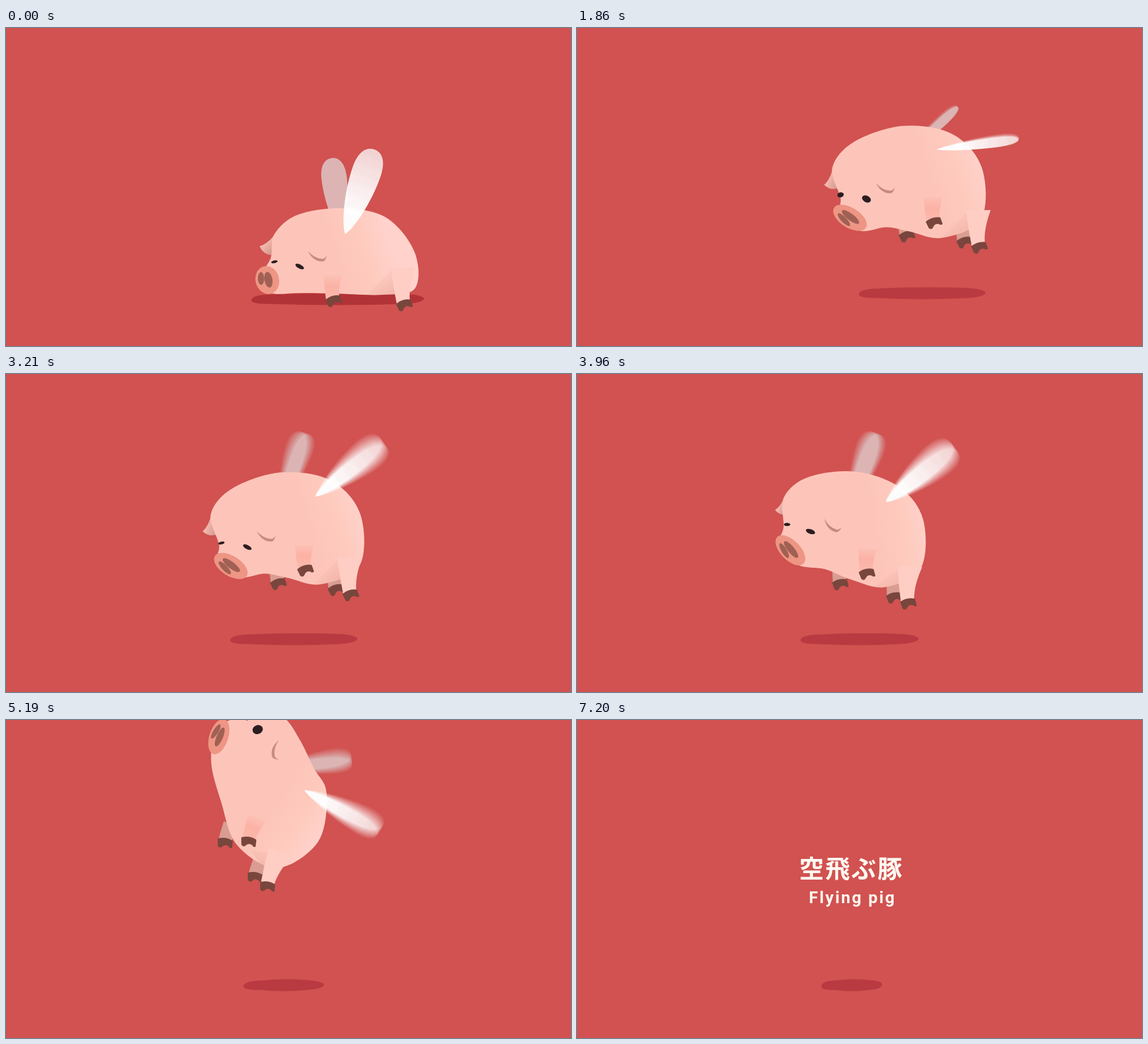
An HTML page with a canvas for the animation above (8100 ms loop, 960x540 px).

```html
<!DOCTYPE html>
<html lang="ja">
<head>
<meta charset="utf-8">
<title>空飛ぶ豚</title>
<style>
  html, body { margin: 0; width: 100%; height: 100%; overflow: hidden; background: #d15250; }
  canvas { display: block; }
</style>
</head>
<body>
<canvas id="stage" width="960" height="540"></canvas>
<script>
const LOOP = 8100, STEP = 30, FLAP = 486, RAD = Math.PI / 180, TURN = 52;
const g = document.getElementById('stage').getContext('2d');
const layer = Object.assign(document.createElement('canvas'), { width: 960, height: 540 }).getContext('2d');

const lerp = (a, b, p) => a + (b - a) * p;
const clamp = p => Math.max(0, Math.min(1, p));
const ramp = (t, from, to) => { const p = clamp((t - from) / (to - from)); return p * p * (3 - 2 * p); };

// Smooth curve through [time, value] keys, flat at both ends.
function track(...keys) {
  const last = keys.length - 1;
  const slope = i => i < 1 || i >= last ? 0
    : (keys[i + 1][1] - keys[i - 1][1]) / (keys[i + 1][0] - keys[i - 1][0]);
  return t => {
    const i = keys.findIndex(k => k[0] > t) - 1;
    if (i < 0) return keys[last][1];
    const [t0, a] = keys[i], [t1, b] = keys[i + 1], d = t1 - t0, p = (t - t0) / d, q = 1 - p;
    return a * (1 + 2 * p) * q * q + slope(i) * d * p * q * q
      + b * p * p * (3 - 2 * p) - slope(i + 1) * d * p * p * q;
  };
}

const pigX = track([0, 577], [900, 620], [1680, 621], [2520, 567], [3210, 527], [4650, 526], [5820, 483], [6500, 467]);
const pigY = track([0, 348], [900, 280], [1629, 212], [3210, 207], [4350, 220], [4650, 211], [5820, 8], [7020, -172], [8100, -330]);
const takeOff = track([0, 0], [900, .62], [1500, 1]);
const shadowX = track([0, 563.5], [900, 598], [1680, 596], [2520, 535], [3210, 489], [4650, 478], [5820, 467]);
const shadowWidth = track([0, 293], [900, 234], [1860, 215], [3210, 216], [4650, 176], [5820, 103]);

// Three key poses in stage positions; `root` is the wing joint everything hangs on.
// outline: brow, crown, neck, back, rump, belly, chin, muzzle. face: snout, eyes, near ear.
// hooves: near front, near hind, far front, far hind. snout: radii and angle.
const poses = [
  { root: [577, 348], tilt: 0, snout: [24, 20, 75],
    outline: [[450, 390], [456, 350], [496, 317], [572, 306], [646, 322], [694, 380],
      [695, 442], [640, 453], [560, 451], [500, 450], [450, 450], [431, 426]],
    face: [[444, 428], [456, 397], [499, 405], [513, 379]],
    hooves: [[555, 458], [675, 465], [549, 435], [637, 435]] },
  { root: [527, 207], tilt: 0, snout: [32, 17, 32],
    outline: [[362, 290], [348, 238], [385, 194], [468, 167], [552, 181], [602, 238],
      [601, 325], [535, 357], [478, 346], [440, 339], [395, 345], [360, 317]],
    face: [[382, 326], [366, 287], [410, 294], [426, 267]],
    hooves: [[507, 328], [584, 370], [461, 351], [559, 361]] },
  { root: [526, 211], tilt: TURN, snout: [31, 16, 108],
    outline: [[408, 87], [455, 79], [490, 87], [517, 125], [540, 172], [562, 215],
      [548, 297], [478, 342], [410, 303], [383, 230], [366, 162], [376, 108]],
    face: [[379, 119], [426, 86], [445, 107], [481, 125]],
    hooves: [[430, 292], [462, 368], [390, 294], [441, 352]] }
].map(({ root, tilt, snout, ...shapes }) => {
  const c = Math.cos(tilt * RAD), s = Math.sin(tilt * RAD);
  const toBody = ([x, y]) => [(x - root[0]) * c + (y - root[1]) * s, (y - root[1]) * c - (x - root[0]) * s];
  const out = { snout: [[snout[0], snout[1], snout[2] - tilt]] };
  for (const name in shapes) out[name] = shapes[name].map(toBody);
  return out;
});

function posed(name, { fly, upright }) {
  const [lying, flying, standing] = poses.map(p => p[name]);
  return lying.map((point, i) => point.map((v, a) =>
    lerp(lerp(v, flying[i][a], fly), standing[i][a], upright)));
}

function within(ctx, [x, y], degrees, draw) {
  ctx.save();
  ctx.translate(x, y);
  ctx.rotate(degrees * RAD);
  draw();
  ctx.restore();
}

function shape(ctx, svgPath, fill) {
  ctx.fillStyle = fill;
  ctx.fill(new Path2D(svgPath));
}

function oval([x, y], rx, ry, degrees, fill) {
  g.beginPath();
  g.ellipse(x, y, rx, ry, degrees * RAD, 0, 2 * Math.PI);
  g.fillStyle = fill;
  g.fill();
}

function smoothPath(points) {
  const n = points.length, at = i => points[(i + n) % n];
  const path = new Path2D();
  path.moveTo(...points[0]);
  for (let i = 0; i < n; i++) {
    const [a, b, c, d] = [at(i - 1), at(i), at(i + 1), at(i + 2)];
    path.bezierCurveTo(b[0] + (c[0] - a[0]) / 6, b[1] + (c[1] - a[1]) / 6,
      c[0] - (d[0] - b[0]) / 6, c[1] - (d[1] - b[1]) / 6, ...c);
  }
  return path;
}

function gradient(ctx, from, to, ...colors) {
  const paint = ctx.createLinearGradient(...from, ...to);
  colors.forEach((color, i) => paint.addColorStop(i / (colors.length - 1), color));
  return paint;
}

function leg(position, upright, length, halfWidth, fill) {
  within(g, position, lerp(0, -30, upright), () => {
    const w = halfWidth, bend = (w - 12) * .6;
    shape(g, `M${-w},${-length} Q${-12 - bend},${-length * .45} -11,4 L11,-3
      Q${11 - bend / 3},${-length * .45} ${w},${-length}Z`, fill);
  });
  within(g, position, lerp(-17, -43, upright), () =>
    shape(g, 'M-13,0 Q0,-6 13,0 L13.5,12 Q10,14 7,10 Q1,7 -3,12 Q-7,17 -11,12Z', '#78463d'));
}

const wingLift = t => t < 171 ? 1 : (1 + Math.cos((t - 171) / FLAP * 2 * Math.PI)) / 2;

function wingShape(length, width, fill) {
  const h = width / 2, l = length;
  const side = s => `C${l * .08},${-s * h * .45} ${l * .42},${-s * h} ${l * .73},${-s * h}
    C${l * .91},${-s * h} ${l},${-s * h * .6} ${l},0`;
  shape(layer, `M-2,0 ${side(1)} M-2,0 ${side(-1)}`, fill);
}

// Averages several moments of the stroke for motion blur.
function wing(t, { x, y, fly, upright }, far) {
  const samples = 10, shutter = 24;
  layer.clearRect(0, 0, 960, 540);
  layer.globalCompositeOperation = 'lighter';
  layer.globalAlpha = 1 / samples;
  for (let i = 0; i < samples; i++) {
    const lift = wingLift(t + (i / (samples - 1) - .5) * shutter), spread = Math.sqrt(lift);
    const joint = far ? [lerp(-8, -60, fly * fly), 14 * fly] : [0, 0];
    const angle = -7 - 64 * lift - (far ? 35 - 9 * lift * lift : 0);
    within(layer, [x, y], upright * TURN, () => within(layer, joint, angle, () => {
      if (far) wingShape(128, 15 + 28 * spread, '#dab6b6');
      else wingShape(138 + 12 * spread, 16 + 34 * spread,
        gradient(layer, [30, 0], [150, 0], '#fff', 'rgba(255,255,255,.88)', 'rgba(255,255,255,.74)'));
    }));
  }
  g.drawImage(layer.canvas, 0, 0);
}

function shadow(t) {
  const grounded = 1 - ramp(t, 0, 800), w = shadowWidth(t) / 2, m = w - Math.min(30, w * .45);
  within(g, [shadowX(t), 450.5 + 10 * grounded], 0, () =>
    shape(g, `M${-w},2 C${-w},-6 ${-m - 10},-8 ${-m},-8 Q0,-12 ${m},-9 C${m + 20},-8 ${w},-4 ${w},-1
      C${w},4 ${m + 15},7 ${m},8 Q0,12 ${-m},8 C${-m - 20},8 ${-w},6 ${-w},2Z`,
      `rgb(${185 - 7 * grounded},${58 - 7 * grounded},${64 - 9 * grounded})`));
}

function face(state) {
  const { upright, effort } = state;
  const [snout, farEye, nearEye, ear] = posed('face', state).map(([x, y]) => [x - 4 * effort, y - 3 * effort]);
  const [[rx, ry, angle]] = posed('snout', state), turn = 25 * upright;
  within(g, snout, angle, () => {
    oval([0, 0], rx, ry, 0, '#ee9584');
    oval([-rx * .22, ry * .48], rx * .45, ry * .27, 14, '#a06154');
    oval([0, -ry * .1], rx * .56, ry * .34, 5, '#a06154');
  });

  const open = Math.max(effort, upright);
  oval(farEye, 5.5, lerp(2.3, 4.3, open), -14 + turn, '#2c1d20');
  oval(nearEye, lerp(8, 9, upright), lerp(3.5, 5.5 + 2 * upright, open), 28 - 4 * turn, '#2c1d20');

  within(g, ear, turn, () =>
    shape(g, 'M0,0 Q9,18 25,17.5 Q30,17 32,7 Q29,13 24,13 Q11,12 0,0Z', '#c98a7e'));
}

function pig(t, state) {
  const { x, y, fly, upright, effort } = state;
  wing(t, state, true);
  within(g, [x, y], upright * TURN, () => {
    const outline = posed('outline', state), body = smoothPath(outline);
    const [nearFront, nearHind, farFront, farHind] =
      posed('hooves', state).map(([hx, hy]) => [hx + 12 * effort, hy - 2 * effort]);

    leg(farFront, upright, 28, 14, '#d99d92');
    leg(farHind, upright, 24, 13, '#d99d92');
    within(g, outline[1], 25 * (1 - fly), () => {
      const size = 1 - upright;
      g.scale(size, size);
      shape(g, 'M2,-4 Q-3,20 -14,29 Q-3,40 12,34 L16,8Z', gradient(g, [-12, 24], [10, 32], '#f8bdb2', '#d3978d'));
    });

    g.fillStyle = gradient(g, [-20, 30], [70, 0], '#fdc5ba', '#fecabd', '#ffd2cb');
    g.fill(body);
    g.save();
    g.clip(body);
    within(g, nearHind, 0, () => shape(g, 'M-16,-58 L-62,-12 L-12,-8Z',
      gradient(g, [-48, -44], [-16, -12], 'rgba(232,160,148,0)', 'rgba(226,152,140,.45)')));
    g.restore();

    leg(nearFront, upright, 38, 16, gradient(g, [0, -38], [0, 0], 'rgba(251,176,162,.2)', '#fbb2a5', '#fdb9ac'));
    leg(nearHind, upright, 58, 21, '#fecdc4');
    face(state);
  });
  wing(t, state, false);
}

function risingText(t, { text, font, x, y, gap, floor, start, stagger }) {
  g.save();
  g.beginPath();
  g.rect(0, 0, 960, floor);
  g.clip();
  g.font = font;
  g.fillStyle = '#fffaf2';
  [...text].forEach((letter, i) => {
    const left = 1 - clamp((t - start - i * stagger) / 800);
    if (left < 1) g.fillText(letter, x, y + 46 * left ** 3);
    x += g.measureText(letter).width + gap;
  });
  g.restore();
}

const lines = [
  { text: '空飛ぶ豚', font: '700 42px "Noto Sans CJK JP", "Noto Sans CJK", sans-serif',
    x: 377.5, y: 267.5, gap: 2.3, floor: 277, start: 5510, stagger: 50 },
  { text: 'Flying pig', font: '700 28px Roboto, sans-serif',
    x: 394, y: 311, gap: 2.6, floor: 333, start: 5900, stagger: 35 }
];

function frame() {
  const t = Math.floor(performance.now() % LOOP / STEP) * STEP;
  g.fillStyle = '#d15250';
  g.fillRect(0, 0, 960, 540);
  shadow(t);
  lines.forEach(line => risingText(t, line));
  if (t < 7050) pig(t, {
    x: pigX(t), y: pigY(t), fly: takeOff(t),
    upright: ramp(t, 3750, 4530),
    effort: ramp(t, 1400, 1800) - ramp(t, 2100, 2500)
  });
  requestAnimationFrame(frame);
}
frame();
</script>
</body>
</html>
```
